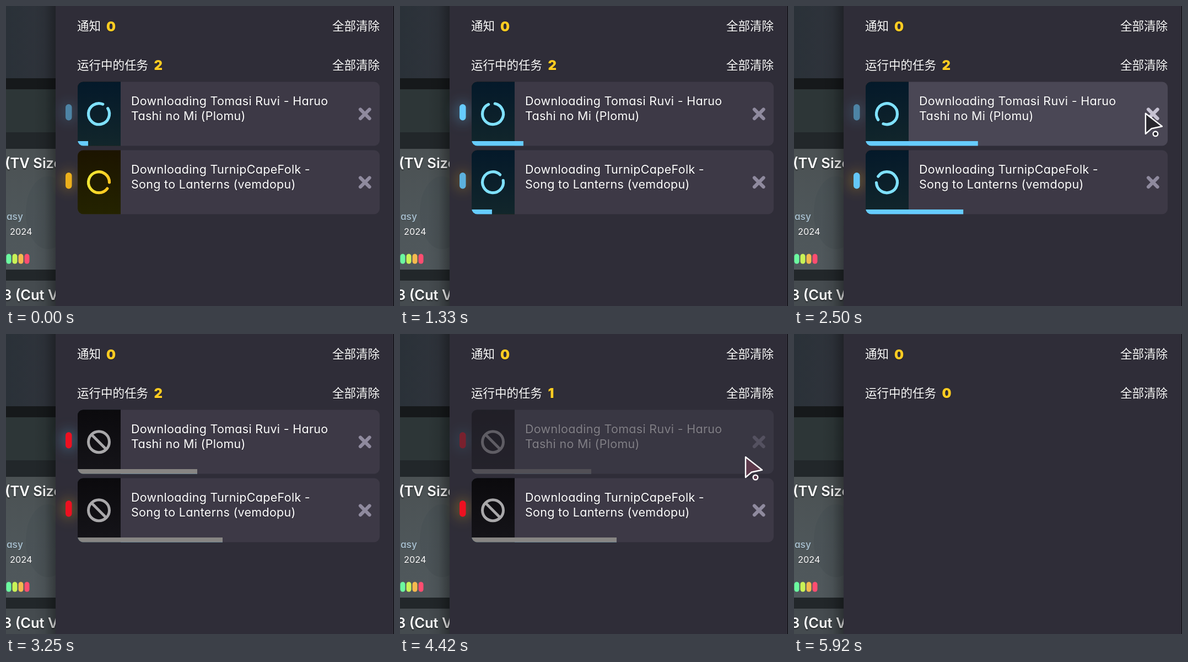
Animation of 704x544 px, one loop 6 s. Source, as an HTML page:

```html
<!DOCTYPE html>
<html lang="zh-CN">
<head>
<meta charset="utf-8">
<title>Download tasks</title>
<style>
  html, body { margin: 0; width: 100%; height: 100%; overflow: hidden; background: #2f2d38; }
  svg { display: block; width: 704px; height: 544px; }
  text { fill: #fff; font-family: Inter, "Noto Sans CJK SC", sans-serif; font-feature-settings: "cv11"; text-shadow: 0 1px 1px #0006; }
  .head { font: 500 21.5px "Noto Sans CJK SC", "Noto Sans CJK", sans-serif; }
  .count { font-size: 24px; font-weight: 900; fill: #fc2; }
  .task { font-size: 21.5px; letter-spacing: .3px; }
  .song { font-size: 25.5px; font-weight: 600; text-shadow: 0 2px 2px #0007; }
  .light { fill: currentColor; filter: drop-shadow(0 0 13px color-mix(in srgb, currentColor 75%, transparent)); }
  .ring { fill: none; stroke-width: 5.2; stroke-linecap: round; }
</style>
</head>
<body>
<svg id="stage" viewBox="0 0 704 544">
  <defs>
    <linearGradient id="top" x2="1"><stop stop-color="#2a3138"/><stop offset="1" stop-color="#30343c"/></linearGradient>
    <linearGradient id="art" x2="0" y2="1"><stop stop-color="#4b5153"/><stop offset=".5" stop-color="#4e5659"/><stop offset="1" stop-color="#50585c"/></linearGradient>
    <linearGradient id="shade" x2="1"><stop stop-opacity="0"/><stop offset=".5" stop-opacity=".08"/><stop offset="1" stop-opacity=".34"/></linearGradient>
    <linearGradient id="queuedBg" x2="0" y2="1"><stop stop-color="#1c1400"/><stop offset="1" stop-color="#242300"/></linearGradient>
    <linearGradient id="activeBg" x2="0" y2="1"><stop stop-color="#04192a"/><stop offset="1" stop-color="#12262b"/></linearGradient>
    <linearGradient id="stoppedBg" x2="0" y2="1"><stop stop-color="#0b0a0d"/><stop offset="1" stop-color="#151419"/></linearGradient>
    <linearGradient id="gold" gradientUnits="userSpaceOnUse" y1="-20" x2="0" y2="20"><stop stop-color="#ffc61f"/><stop offset="1" stop-color="#f0e736"/></linearGradient>
    <clipPath id="card"><rect x="130" y="137.5" width="548" height="116" rx="10"/></clipPath>
  </defs>

  <rect width="90" height="544" fill="#22272a"/>
  <rect width="90" height="131" fill="url(#top)"/>
  <rect y="131" width="90" height="20" fill="#16191b"/>
  <rect y="151" width="90" height="78" fill="#2d3637"/>
  <rect y="259" width="90" height="219" fill="url(#art)"/>
  <ellipse cx="76" cy="375" rx="40" ry="66" fill="#454e53" opacity=".45"/>
  <rect y="498" width="90" height="46" fill="#454b4f"/>
  <text class="song" x="-2" y="294">(TV Size)</text>
  <text x="1" y="388" style="font-size:17px;font-weight:600;fill:#a4bbca">asy</text>
  <text x="7" y="415" font-size="16.3">2024</text>
  <g id="levels"></g>
  <text class="song" x="-6" y="533">3 (Cut Ver.)</text>
  <rect x="50" width="40" height="544" fill="url(#shade)"/>

  <rect x="90" width="614" height="544" fill="#2f2d38"/>
  <rect x="703" width="1" height="544" fill="#08080a"/>
  <text class="head" x="129" y="44">通知</text>
  <text class="count" x="182" y="45.5">0</text>
  <text class="head" x="592" y="44">全部清除</text>
  <text class="head" x="129" y="115">运行中的任务</text>
  <text class="count" id="count" x="268.5" y="116">2</text>
  <text class="head" x="592" y="115">全部清除</text>
  <g id="rows"></g>
  <g id="cursor" stroke="#fff" stroke-width="2.4" stroke-linejoin="round">
    <path d="M1 1V38L12 28.5L31 24.5Z"/>
    <circle cx="19" cy="38" r="4.3"/>
  </g>
</svg>
<script>
const LOOP = 6000;
const $ = id => document.getElementById(id);
const clamp = v => Math.max(0, Math.min(1, v));
const ramp = (t, start, length) => clamp((t - start) / length);
const smooth = p => p * p * (3 - 2 * p);
const quart = p => p < .5 ? 8 * p ** 4 : 1 - 8 * (1 - p) ** 4;

// Value at time t along keys of [time, value], eased within each span.
function along(keys, t, column = 1, ease = p => p) {
  if (t <= keys[0][0]) return keys[0][column];
  for (let i = 1; i < keys.length; i++) {
    const a = keys[i - 1], b = keys[i];
    if (t < b[0]) return a[column] + (b[column] - a[column]) * ease((t - a[0]) / (b[0] - a[0]));
  }
  return keys.at(-1)[column];
}

const tasks = [
  { lines: ['Downloading Tomasi Ruvi - Haruo', 'Tashi no Mi (Plomu)'],
    start: -999, stop: 2620, close: 4330, dim: -50, angle: 40,
    progress: [[0, 19], [750, 53], [1830, 129], [2620, 217]] },
  { lines: ['Downloading TurnipCapeFolk -', 'Song to Lanterns (vemdopu)'],
    start: 650, stop: 2920, close: 4660, dim: 1750, angle: 108,
    progress: [[720, 0], [1830, 67], [2300, 136], [2920, 263]] }
];
// time, x, y, opacity
const path = [
  [600, 345, 562, 1], [750, 346, 536, 1], [1000, 344, 531, 1], [1400, 352, 546, 1],
  [1830, 573, 228, 1], [2050, 628, 192, 1], [2620, 638, 194, 1], [2900, 628, 312, 1],
  [3000, 626, 322, 1], [3220, 580, 435, 0], [3400, 430, 560, 0], [3500, 430, 560, 1],
  [4000, 634, 250, 1], [4200, 650, 205, 1], [4420, 626, 222, 1], [4660, 626, 220, 1],
  [4830, 518, 231, 1], [5000, 470, 238, 1], [5260, 440, 244, 0]
];
const clicks = [2620, 2920, 4330, 4660];

$('levels').innerHTML = ['#6bf9a0', '#c9f256', '#f5b94e', '#ff4d70']
  .map((c, i) => `<rect x="${.5 + i * 11}" y="449.5" width="9" height="18" rx="4.5" fill="${c}"/>`).join('');

const arc = '<path class="ring" d="M5.9 -18.1A19 19 0 1 1 -5.9 -18.1" stroke=';
const state = (name, icon, color) => `<g class="${name}">
  <rect x="130" y="137" width="78" height="117" fill="url(#${name}Bg)"/>
  <g transform="translate(168.5 195.7)">${icon}</g>
  <rect class="bar" x="130" y="245" height="9" fill="${color}"/></g>`;

for (const task of tasks) {
  const row = document.createElementNS('http://www.w3.org/2000/svg', 'g');
  row.innerHTML = `<rect class="light" x="108" y="178" width="11.5" height="29.5" rx="5.7"/>
    <g clip-path="url(#card)">
      <rect class="back" x="130" y="137" width="548" height="117"/>
      ${state('queued', `<g class="spin">${arc}"url(#gold)"/></g>`, 'none')}
      ${state('active', `<g class="spin">${arc}"#7fe1ff"/></g>`, '#6cf')}
      ${state('stopped', '<g fill="none" stroke="#a9a8aa" stroke-width="5"><circle r="19"/><path d="M-13 -13L13 13"/></g>', '#878583')}
    </g>
    <text class="task" x="227" y="179.5">${task.lines[0]}</text>
    <text class="task" x="227" y="206.5">${task.lines[1]}</text>
    <path class="cross" d="M643 187.5l16.5 16.5m0 -16.5l-16.5 16.5" stroke-width="6.2" stroke-linecap="round"/>`;
  $('rows').append(row);
  task.row = row;
  task.part = name => row.querySelector('.' + name);
}

function pulse(t, dim) {
  const p = ((t - dim + 1000) % 2500 + 2500) % 2500 / 1000;
  return 1 - .5 * (p < 1 ? p * p : p < 2 ? (2 - p) ** 2 : 0);
}

// Steady spin plus an eased quarter turn every 900 ms.
function spin(t) {
  const turns = t / 900 + .4;
  return t * 360 / 3150 + 90 * (Math.floor(turns) + quart(turns % 1) - quart(.4));
}

function drawTask(task, i, t, x, y, visible) {
  const { row, part } = task;
  const top = i ? 124 * (1 - smooth(ramp(t, 4480, 130))) : 0;
  const stopped = t >= task.stop;
  const hover = visible && x > 130 && x < 678 && y > 137 + top && y < 254 + top;

  row.setAttribute('transform', `translate(0 ${top})`);
  row.setAttribute('opacity', 1 - ramp(t, task.close, 150));
  part('light').style.color = stopped ? '#ed1121' : t < task.start ? '#f3b51c' : '#6cf';
  part('light').style.opacity = stopped ? 1 : pulse(t, task.dim);
  part('back').setAttribute('fill', hover ? '#4a4755' : '#3d3946');
  part('cross').setAttribute('stroke', hover && x > 627 ? '#c6c2d2' : '#8f8a9e');
  part('active').setAttribute('opacity', ramp(t, task.start, 260));
  part('stopped').setAttribute('opacity', ramp(t, task.stop, 120));
  row.querySelectorAll('.spin').forEach(s => s.setAttribute('transform', `rotate(${task.angle + spin(t)})`));
  row.querySelectorAll('.bar').forEach(b => b.setAttribute('width', along(task.progress, t)));
}

function draw(now) {
  const t = now % LOOP;
  const [x, y] = [1, 2].map(column => along(path, t, column, smooth));
  const opacity = t < path[0][0] ? 0 : along(path, t, 3);
  tasks.forEach((task, i) => drawTask(task, i, t, x, y, opacity > .5));
  $('count').textContent = t < 4380 ? 2 : t < 4740 ? 1 : 0;

  const press = clicks.some(c => t >= c - 60 && t < c + 120);
  $('cursor').setAttribute('transform', `translate(${x} ${y})`);
  $('cursor').setAttribute('opacity', opacity);
  $('cursor').setAttribute('fill', press ? '#5c394b' : '#28272e');
  requestAnimationFrame(() => draw(performance.now()));
}
draw(performance.now());
</script>
</body>
</html>
```
